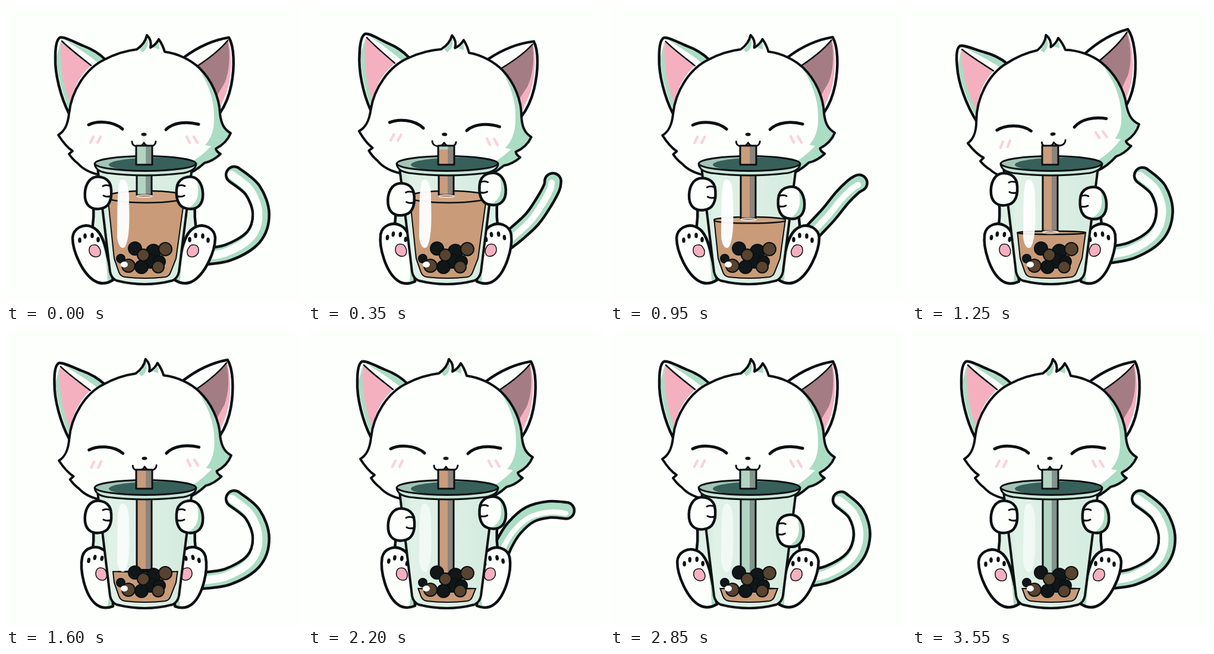
Animation, 498 px wide and 498 px high, one loop 3.6 s. Source, as an HTML page with a canvas:

```html
<!DOCTYPE html>
<html lang="en">
<head>
<meta charset="utf-8">
<title>Cat with bubble tea</title>
<style>
html, body { margin: 0; width: 100%; height: 100%; overflow: hidden; background: #fdfffd; }
canvas { display: block; width: 498px; height: 498px; }
</style>
</head>
<body>
<canvas id="stage" width="498" height="498"></canvas>
<script>
const ctx = document.getElementById('stage').getContext('2d');
const LOOP = 3600, STEP = 50, SWAY = 1680;
const INK = '#0b1012', WHITE = '#fdfffd', MINT = '#abdcc4', GLASS = '#d9ede2';
const PINK = '#f5b0c0', TEA = '#c99b78';

const shape = d => new Path2D(d);
const shapes = {
  earL: shape('M106 181C92 153 82 115 83 86C83 68 85 56 91 53C97 51 111 59 130 67C146 73 158 81 167 90L150 130Z'),
  earLPink: shape('M93 58C107 72 127 87 143 100C123 119 112 140 107 170C94 137 87 92 93 58Z'),
  earLEdge: shape('M94 59C108 73 127 87 143 100'),
  earLRim: shape('M85 86C86 115 94 145 105 172L107 160C95 130 90 95 92 60Z'),
  earLShade: shape('M100 57C121 67 149 75 165 90L154 95C134 78 118 70 100 57Z'),
  earR: shape('M300 86C323 69 350 57 375 53C384 68 385 102 379 133C375 153 369 167 360 180L330 130Z'),
  earRPink: shape('M374 57C381 82 380 119 371 145L359 174C355 143 344 121 322 101C343 86 360 74 374 57Z'),
  earRDark: shape('M373 59C378 82 376 110 368 129L355 151C348 128 338 114 322 101C343 86 360 74 373 59Z'),
  earREdge: shape('M373 58C360 74 343 87 322 101'),
  face: shape('M106 181C110 143 134 105 166 90C185 80 203 75 220 73C229 67 235 59 237 49C243 55 245 62 243 70C249 67 254 62 257 56C262 63 265 70 267 77C290 80 311 91 325 104C346 124 359 154 360 181C362 200 368 208 378 214C373 226 365 234 353 240Q354 245 361 249Q348 261 334 264C322 275 312 281 300 285L162 285C144 282 130 275 121 265Q112 258 106 249L112 244C103 238 95 228 88 217C98 211 104 201 106 181Z'),
  faceShade: shape('M312 88C334 116 350 150 350 184C351 209 345 223 335 234L345 236C332 249 319 260 301 268L320 290L390 260L385 190L350 110Z'),
  tuftShade: shape('M225 73Q234 66 237 53Q241 62 236 72L230 78ZM248 70Q254 66 257 60L258 73Z'),
  eyes: shape('M139 200C153 193 180 193 196 207M269 208C282 195 305 194 324 199'),
  blush: shape('M142 230L147 220M154 230L159 220M304 220L309 230M316 220L322 230'),
  mouth: shape('M212 228C212 238 228 239 232 230C237 239 251 238 252 228'),
  body: shape('M146 325Q150 355 143 385L160 460H304L322 385Q315 355 319 325Z'),
  foot: shape('M150 463C130 452 112 414 112 390C113 374 130 366 143 371C160 376 167 401 171 422L180 461Q164 471 150 463Z'),
  footShade: shape('M150 373Q167 388 172 424L180 463L171 464Q169 400 150 373Z'),
  pad: shape('M140 409C141 400 153 400 156 406C161 412 160 421 153 422C145 423 139 417 140 409Z'),
  paw: shape('M176 302C171 286 150 283 140 294C131 305 130 327 139 336C148 345 168 342 173 332C178 324 178 311 176 302Z'),
  fingers: shape('M176 303Q168 300 163 303M176 320Q169 322 164 319'),
  pawShade: shape('M136 295Q129 320 139 337Q150 344 160 341C142 333 137 318 143 292Z'),
  cup: shape('M154 272L175 447Q177 458 186 462Q234 474 280 462Q289 458 291 447L313 272Z'),
  tea: shape('M166 280L181 425L189 448Q192 456 200 457Q234 461 268 457Q275 456 278 448L287 425L307 280Z'),
  shine: shape('M192 294C203 286 208 305 207 330C208 360 208 389 201 404C195 413 187 401 187 386C188 350 186 310 192 294Z'),
  rim: shape('M149 265C150 275 158 279 170 281Q234 289 299 281C313 278 320 273 320 265Z')
};
const tailUp = [[325, 422], [373, 415], [416, 389], [429, 350], [415, 310], [384, 284]];
const tailOut = [[316, 390], [325, 354], [339, 327], [367, 306], [405, 301], [440, 306]];
const pearls = [
  [193, 425, 7, 0], [248, 413, 12, 0], [217, 408, 11, 0], [243, 429, 12, 0], [228, 439, 11, 0], [258, 430, 10, 0],
  [231, 419, 10, 1], [268, 409, 11, 1], [206, 437, 11, 1], [256, 439, 10, 1]
];
const toes = [[124, 394], [133, 387], [145, 386], [155, 393]];

// Eased value through a list of [time, value] keys
function track(t, keys) {
  const i = keys.findIndex(k => k[0] > t);
  if (i < 0) return keys[keys.length - 1][1];
  if (i === 0) return keys[0][1];
  const [t0, a] = keys[i - 1], [t1, b] = keys[i];
  return a + (b - a) * (1 - Math.cos(Math.PI * (t - t0) / (t1 - t0))) / 2;
}
const mix = (a, b, k) => a + (b - a) * k;
const clamp = v => Math.max(0, Math.min(1, v));

function fill(path, color) {
  ctx.fillStyle = color;
  ctx.fill(path);
}
function line(path, width = 4.5, color = INK) {
  ctx.strokeStyle = color;
  ctx.lineWidth = width;
  ctx.stroke(path);
}
function oval(x, y, rx, ry = rx) {
  const p = new Path2D();
  p.ellipse(x, y, rx, ry, 0, 0, Math.PI * 2);
  return p;
}
function scoped(draw) {
  ctx.save();
  draw();
  ctx.restore();
}
function mirrored(axis, draw) {
  scoped(() => {
    ctx.translate(axis * 2, 0);
    ctx.scale(-1, 1);
    draw();
  });
}

function drawTail(k) {
  const pts = tailUp.map((p, i) => [mix(p[0], tailOut[i][0], k), mix(p[1], tailOut[i][1], k)]);
  const path = new Path2D();
  path.moveTo(...pts[0]);
  for (let i = 0; i < pts.length - 1; i++) {
    const [p0, p1, p2, p3] = [pts[i - 1] || pts[i], pts[i], pts[i + 1], pts[i + 2] || pts[i + 1]];
    path.bezierCurveTo(
      p1[0] + (p2[0] - p0[0]) / 6, p1[1] + (p2[1] - p0[1]) / 6,
      p2[0] - (p3[0] - p1[0]) / 6, p2[1] - (p3[1] - p1[1]) / 6, p2[0], p2[1]);
  }
  line(path, 32);
  line(path, 23, MINT);
  scoped(() => {
    ctx.translate(mix(-4.5, 0, k), mix(0, 5, k));
    line(path, mix(14, 8, k), WHITE);
  });
}

function drawHead(angle) {
  scoped(() => {
    ctx.translate(230, 165);
    ctx.rotate(angle);
    ctx.translate(-230, -165);
    fill(shapes.earL, WHITE);
    fill(shapes.earLShade, MINT);
    fill(shapes.earLPink, PINK);
    fill(shapes.earLRim, MINT);
    line(shapes.earLEdge, 2.5);
    line(shapes.earL);
    fill(shapes.earR, WHITE);
    fill(shapes.earRPink, PINK);
    fill(shapes.earRDark, '#a47c84');
    line(shapes.earREdge, 2.5);
    line(shapes.earR);
    fill(shapes.face, WHITE);
    scoped(() => {
      ctx.clip(shapes.face);
      fill(shapes.faceShade, MINT);
      fill(shapes.tuftShade, MINT);
    });
    line(shapes.face, 4);
    line(shapes.eyes, 5);
    line(shapes.blush, 4.5, '#fad3db');
    fill(oval(232, 216, 4.5, 2.8), INK);
    line(shapes.mouth, 3);
  });
}

function drawFoot(turn) {
  scoped(() => {
    ctx.translate(162, 463);
    ctx.rotate(turn);
    ctx.translate(-162, -463);
    fill(shapes.foot, WHITE);
    fill(shapes.footShade, MINT);
    line(shapes.foot);
    fill(shapes.pad, PINK);
    line(shapes.pad, 1.5);
    toes.forEach(([x, y]) => fill(oval(x, y, 2.8, 4.5), INK));
  });
}

function drawPaw(shaded) {
  fill(shapes.paw, WHITE);
  if (shaded) fill(shapes.pawShade, MINT);
  line(shapes.paw);
  line(shapes.fingers, 3);
}

function drawStraw(x, width, top, bottom, teaTop, teaBottom) {
  const paint = (y0, y1, light, dark) => {
    if (y1 <= y0) return;
    ctx.fillStyle = light;
    ctx.fillRect(x, y0, width, y1 - y0);
    ctx.fillStyle = dark;
    ctx.fillRect(x + width * 0.6, y0, width * 0.4, y1 - y0);
  };
  paint(top, bottom, '#b3d3c3', '#82958c');
  paint(Math.max(top, teaTop), Math.min(bottom, teaBottom), '#c99c7c', '#8d837d');
  const edge = new Path2D();
  edge.rect(x, top, width, bottom - top);
  line(edge, 3);
}

function drawCup(t) {
  const level = mix(321, 435, clamp((t - 400) / 1600));
  const ry = 10 * clamp((405 - level) / 84);
  const teaTop = mix(level, 230, clamp(t / 400));
  const teaBottom = mix(level, 230, clamp((t - 2230) / 400));

  fill(shapes.cup, GLASS);
  scoped(() => {
    ctx.clip(shapes.cup);
    const side = ctx.createLinearGradient(150, 0, 315, 0);
    side.addColorStop(0, '#bfe2d0');
    side.addColorStop(0.15, '#e0f1e8');
    side.addColorStop(1, '#d5ebdf');
    ctx.fillStyle = side;
    ctx.fillRect(150, 270, 170, 200);
  });

  scoped(() => {
    ctx.clip(shapes.tea);
    ctx.fillStyle = TEA;
    ctx.fillRect(150, level, 170, 160);
    const depth = (level - 321) / 114;
    const left = mix(169, 182, depth);
    const right = mix(304, 286, depth);
    const surface = oval((left + right) / 2, level, (right - left) / 2, Math.max(ry, 0.5));
    fill(surface, '#cfa382');
    line(surface, 2.5);
    ctx.beginPath();
    ctx.rect(150, level, 170, 160);
    ctx.clip();
    line(shapes.tea, 4);
  });
  drawStraw(220, 25, 272, Math.min(level - 3, 410), teaTop, teaBottom);
  if (level < 398) line(oval(233, level - 1, 13, 2), 2, '#e5d5c8');

  pearls.forEach(([x, y, r, brown]) => {
    const pearl = oval(x, y, r);
    fill(pearl, brown ? '#57432f' : '#111619');
    line(pearl, 2);
  });
  fill(oval(199, 435, 6, 5), WHITE);
  fill(shapes.shine, `rgba(255,255,255,${mix(0.95, 0.6, clamp((t - 1200) / 700))})`);
  line(shapes.cup, 4);

  fill(shapes.rim, '#c7e6d7');
  line(shapes.rim, 3);
  const lid = oval(234.5, 265, 85, 12.5);
  fill(lid, '#a3c4b7');
  scoped(() => {
    ctx.clip(lid);
    fill(oval(255, 267, 82, 12), '#37605a');
  });
  line(lid, 3);
  drawStraw(219, 27, 235, 267, teaTop, teaBottom);
}

function draw(t) {
  const sway = t >= SWAY ? t - SWAY : t;
  const tilt = track(t, [[0, 0], [660, 0.082], [1260, -0.1], [1740, 0]]);
  const tail = track(sway, [[60, 0], [640, 1], [760, 1], [1190, 0.08], [1290, 0.06], [1420, -0.03], [1600, 0]]);
  const leftY = track(sway, [[0, 0], [480, 13], [720, 13], [1140, -6], [1260, -6], [1600, 0]]);
  const rightY = track(sway, [[0, 0], [420, -7], [550, -7], [1140, 24], [1430, 2], [1600, 0]]);
  const turn = track(t % 900, [[0, 0], [60, 0], [560, 0.215], [710, 0.21], [850, 0]]);

  ctx.fillStyle = WHITE;
  ctx.fillRect(0, 0, 498, 498);
  ctx.lineCap = ctx.lineJoin = 'round';

  drawTail(tail);
  fill(shapes.body, '#def1e7');
  line(shapes.body);
  drawHead(tilt);
  drawFoot(turn);
  mirrored(232, () => drawFoot(turn));
  drawCup(t);
  scoped(() => {
    ctx.translate(Math.max(0, leftY) * 0.15, leftY);
    drawPaw(false);
  });
  mirrored(232, () => {
    ctx.translate(rightY * 0.24, rightY);
    drawPaw(true);
  });
}

const start = performance.now();
function frame() {
  const elapsed = (performance.now() - start) % LOOP;
  draw(Math.floor(elapsed / STEP) * STEP);
  requestAnimationFrame(frame);
}
frame();
</script>
</body>
</html>
```
